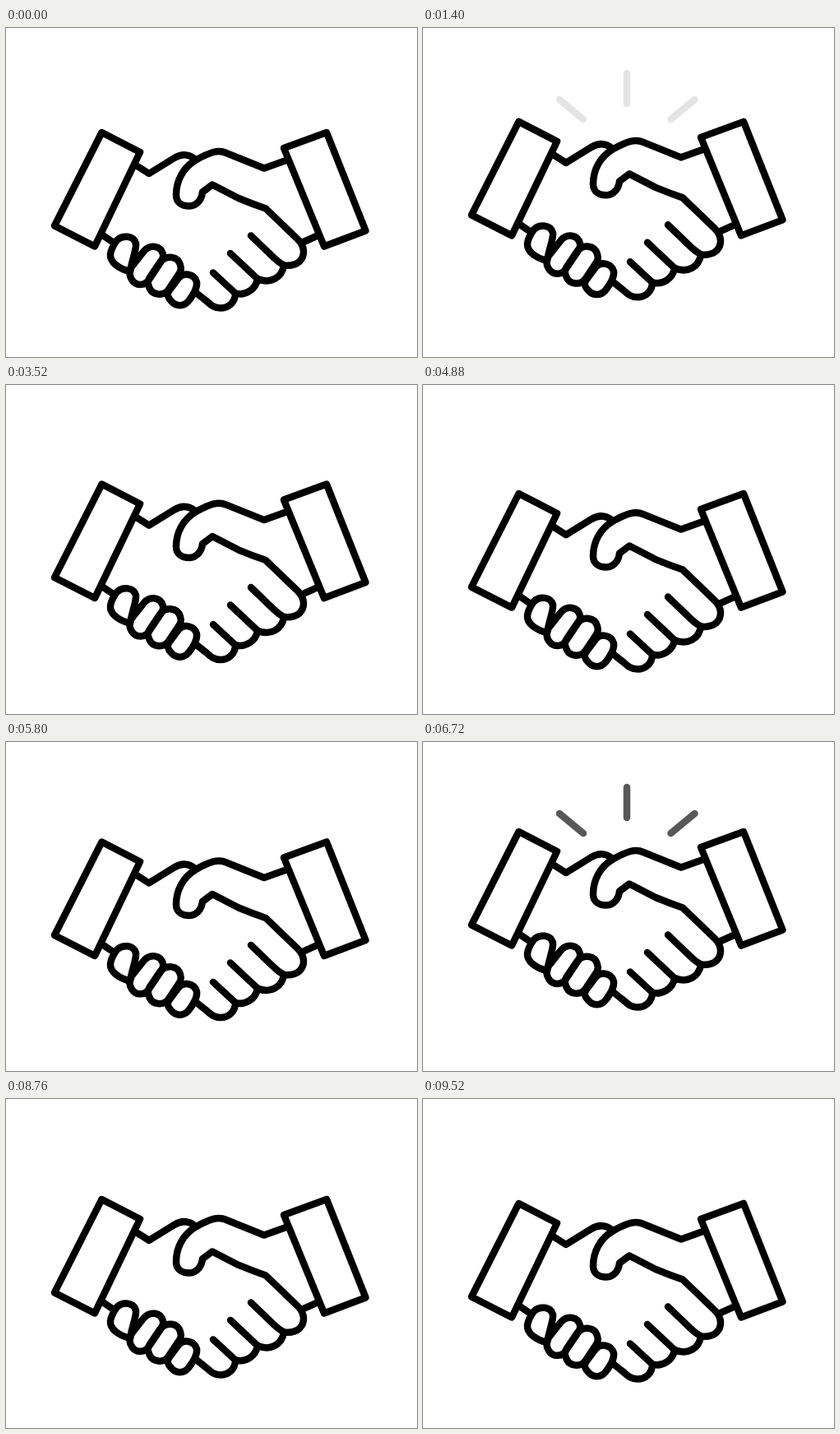
Write an HTML page that moves like this. It is 500 px wide and 400 px high and loops after 9600 ms.

```html
<!DOCTYPE html>
<html lang="en">
<head>
<meta charset="utf-8">
<title>Handshake</title>
<style>
  html, body { margin: 0; width: 100%; height: 100%; overflow: hidden; background: #fff; }
  svg { display: block; width: 500px; height: 400px; }
  path { fill: none; stroke: #000; stroke-width: 8.5; stroke-linecap: round; stroke-linejoin: round; }
</style>
</head>
<body>
<svg viewBox="0 0 500 400">
  <path id="rays" opacity="0" d="M248 55V92M166 87L195 111M330.500 87L301.500 111"/>
  <g id="hands">
    <!-- cuffs -->
    <path d="M116.5 127L163 151L108 265.500L59 240.5Z"/>
    <path d="M390 127L338 146L387 265.500L437.5 246.5Z"/>
    <!-- wrists and back of the left hand -->
    <path d="M159 167.500L174 177L204 158.500Q218 149.500 230 159.500"/>
    <path d="M117 251.500L128 259M380 252L360 261"/>
    <!-- right hand with thumb -->
    <path d="M342 160.500L314 170.500L268 152C258 147.500 248 151 231 160.500C215 170 207 186 207 203C207 212 214 216.500 223 216.500C232 216 238 209 239 199.500L251 190.500L283 207Q300 214 316 219.500L355 257C364 266 364 277 357 284Q350 290 338 288.500"/>
    <!-- right fingers -->
    <path d="M298 252.500L325 278.500Q331 284.500 338 288.500C336 303 322 312 306 305"/>
    <path d="M273 274L306 305C304 318 291 326 279 322.500"/>
    <path d="M252 297.500L279 322.500C279 334 270 340.500 261 340.500C251 340.500 247 334 242 330.500L232 322.500"/>
    <!-- left fingers -->
    <path d="M151 296C138 293 126 285 127 275C128 268 132 262 135 258C142 251.500 155 252 158 262C159 269 154 279 151 296"/>
    <path d="M153 290L168 271C175 263 188 264 191 275C192 279 190 282 188 285L174.500 305C170 314 158 314 153 306C149 300 150 295 153 290Z"/>
    <path d="M174.500 304L188 284C195 276 209 277 212 288C214 294 212 297 209 301L197 319C191 326 179 325 175 317C172 311 172 308 174.500 304Z"/>
    <path d="M198 320L210 304C215 297 229 298 232 309C233 316 229 323 222 332C216 339 207 339 201 332C196 327 196 324 198 320Z"/>
  </g>
</svg>
<script>
  const LOOP = 9600;
  const FADE = 1100;
  // [time, vertical offset]
  const poses = [[0, 0], [2330, -20], [4630, 5.7], [7180, -20], [9560, 0], [LOOP, 0]];
  const flashes = [2270, 7162];
  const hands = document.getElementById("hands");
  const rays = document.getElementById("rays");

  const ease = p => (1 - Math.cos(Math.PI * p)) / 2;

  function offsetAt(t) {
    const i = poses.findIndex(pose => pose[0] > t);
    const [t0, y0] = poses[i - 1], [t1, y1] = poses[i];
    return y0 + (y1 - y0) * ease((t - t0) / (t1 - t0));
  }

  function glowAt(t) {
    const distance = Math.min(...flashes.map(peak => Math.abs(t - peak)));
    return ease(Math.max(0, 1 - distance / FADE));
  }

  function draw() {
    const t = performance.now() % LOOP;
    hands.setAttribute("transform", `translate(0 ${offsetAt(t).toFixed(2)})`);
    rays.setAttribute("opacity", glowAt(t).toFixed(3));
    requestAnimationFrame(draw);
  }
  draw();
</script>
</body>
</html>
```
